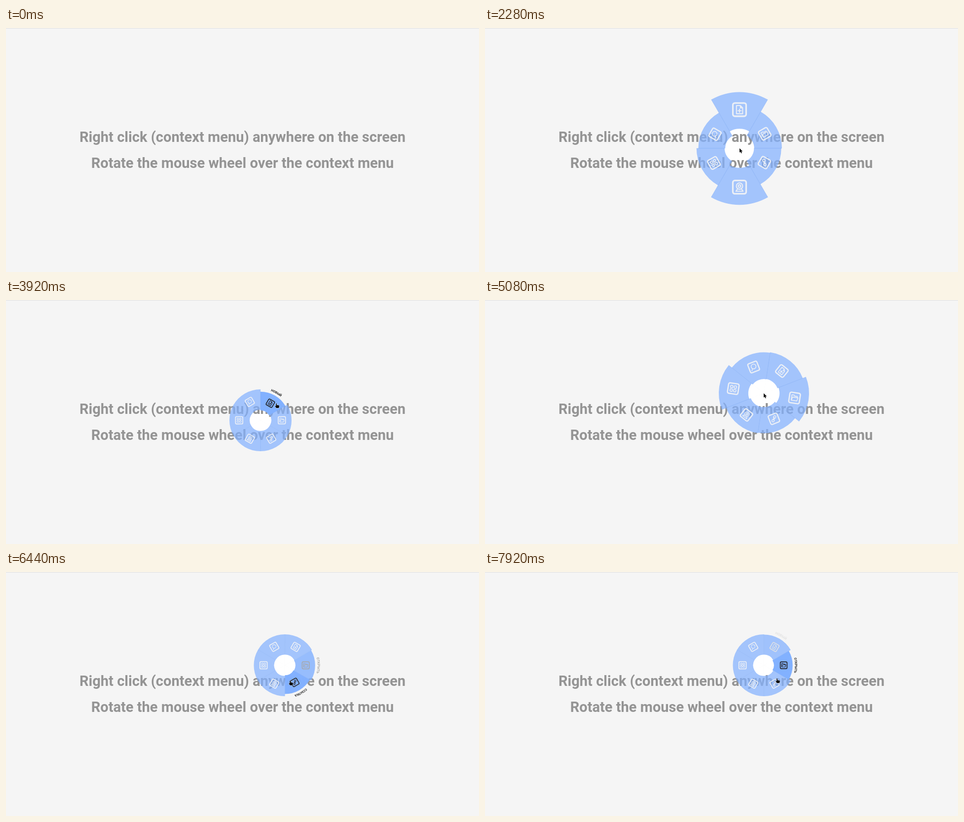
Animation of 959 by 497 pixels, one loop 8 s. Source, as an HTML page with a canvas:

```html
<!DOCTYPE html>
<html lang="en">
<head>
<meta charset="utf-8">
<title>Radial context menu</title>
<style>
  html, body { margin: 0; width: 100%; height: 100%; overflow: hidden; background: #f5f5f5; }
  canvas { display: block; }
</style>
</head>
<body>
<canvas id="stage" width="959" height="497"></canvas>
<script>
const ctx = document.getElementById('stage').getContext('2d');
const LOOP = 8000, RAD = Math.PI / 180;
const OUTER = 63, INNER = 21.8, ICON_R = 43.3, LABEL_R = 68;
const HEADING = [
  ['Right click (context menu) anywhere on the screen', 232],
  ['Rotate the mouse wheel over the context menu', 285]
];

const clamp = (v, a = 0, b = 1) => Math.min(b, Math.max(a, v));
const mix = (a, b, k) => a + (b - a) * k;
const smooth = k => { k = clamp(k); return k * k * (3 - 2 * k); };
const easeOut = k => 1 - (1 - clamp(k)) ** 2;

// Icon glyphs, drawn around the centre of a 16 px tile.
function strokePath(d) { ctx.stroke(new Path2D(d)); }

function drawFile() {
  strokePath('M-3.4 -4.6H1L3.5 -2.1V4.6H-3.4Z M1 -4.6V-2H3.5 M0 -.6V3 M-1.8 1.2H1.8');
}
function drawFolder() {
  strokePath('M-4.3 3.7V-3.9H-1.2L0 -2.6H3.6V-1 M-4.3 3.7L-2.7 -.9H4.7L3.6 3.7Z');
}
function drawLink() {
  ctx.save();
  ctx.rotate(45 * RAD);
  for (const y of [-3, 3]) {
    ctx.beginPath();
    ctx.roundRect(-1.7, y - 2.2, 3.4, 4.4, 1.7);
    ctx.stroke();
  }
  strokePath('M0 -2V2');
  ctx.restore();
}
function drawCamera() {
  for (const r of [3.5, 1.4]) {
    ctx.beginPath();
    ctx.arc(0, -1.2, r, 0, 7);
    ctx.stroke();
  }
  strokePath('M-2.4 2.3L-4 4.6H4L2.4 2.3');
}
function drawGrid() {
  for (const x of [-4.2, .9]) for (const y of [-4.2, .9]) {
    ctx.beginPath();
    ctx.roundRect(x, y, 3.3, 3.3, .7);
    ctx.stroke();
  }
}
function drawSearch() {
  ctx.beginPath();
  ctx.arc(.2, -.8, 3.7, 0, 7);
  ctx.stroke();
  strokePath('M-2.3 2L-4.6 4.5');
}

// Clockwise from the top; turn keeps each icon upright.
const ITEMS = [
  { label: 'НОВЫЙ', icon: drawFile, turn: 0 },
  { label: 'ОТКРЫТЬ', icon: drawFolder, turn: -90 },
  { label: 'ССЫЛКА', icon: drawLink, turn: -180 },
  { label: 'КАМЕРА', icon: drawCamera, turn: -180 },
  { label: 'МОДУЛИ', icon: drawGrid, turn: -270 },
  { label: 'ПОИСК', icon: drawSearch, turn: 0 }
];

const MENUS = [
  { open: 2080, close: 4000, x: 516, y: 245, spin: -60,
    swell: [.83, .37, .35, .84, .39, .33], dip: [0, 0, 0, .02, 0, 0] },
  { open: 4640, close: Infinity, x: 565.5, y: 190, spin: 40,
    swell: [.65, .86, .55, .58, .86, .62], dip: [-.05, -.135, -.17, -.07, -.09, -.09] }
];

// Value from [time, value] keys.
function track(keys, t) {
  if (t <= keys[0][0]) return keys[0][1];
  for (let i = 1; i < keys.length; i++) {
    const [t0, a] = keys[i - 1], [t1, b] = keys[i];
    if (t < t1) return mix(a, b, (t - t0) / (t1 - t0));
  }
  return keys[keys.length - 1][1];
}

const ORBIT = [[5600, 0], [5880, 92], [6100, 89], [6240, 84], [6290, 62], [6440, 34], [7920, 39]];

function cursorAt(t) {
  if (t < 1300) {
    const k = easeOut((t - 480) / 800);
    return [mix(47, 415, k), mix(-12, 210, k)];
  }
  if (t < 2900) {
    const k = smooth((t - 1320) / 560), q = 1 - k;
    return [415 * q * q + 920 * q * k + 516 * k * k, 210 * q * q + 560 * q * k + 245 * k * k];
  }
  if (t < 3900) {
    const k = smooth((t - 2960) / 760);
    return [mix(516, 549, k), mix(245, 211, k)];
  }
  if (t < 5600) {
    const k = smooth((t - 3980) / 440);
    return [mix(549, 565, k), mix(211, 190, k)];
  }
  const a = (159 + .4696 * (t - 6440)) * RAD, r = track(ORBIT, t);
  return [565 + r * Math.sin(a), 190 - r * Math.cos(a)];
}

const menuAt = t => MENUS.find(m => t >= m.open && t < m.close + 240);
const rotation = (m, t) => m.spin * Math.exp(-(t - m.open) / 290);

function hoverAt(m, t) {
  if (t < m.open + 300 || t > m.close + 60) return -1;
  const [x, y] = cursorAt(t), dx = x - m.x, dy = y - m.y, r = Math.hypot(dx, dy);
  if (r < INNER || r > 68) return -1;
  const deg = Math.atan2(dx, -dy) / RAD - rotation(m, t);
  return Math.floor(((deg % 360) + 360) % 360 / 60);
}

// Recent hovering, weighted by age, gives each sector a soft highlight.
function highlights(m, t) {
  const sums = ITEMS.map(() => 0);
  let total = 0;
  for (let age = 0; age < 320; age += 4) {
    const w = Math.exp(-age / 45), i = hoverAt(m, t - 35 - age);
    total += w;
    if (i >= 0) sums[i] += w;
  }
  return sums.map(s => clamp(1.4 * s / total));
}

function sectorScale(m, i, t, hover) {
  const age = t - m.open, k = age / 170;
  const bump = k * Math.exp(1 - k);
  const settle = Math.exp(-(((age - 920) / 220) ** 2));
  const shrink = 1 - smooth((t - m.close) / 240);
  return (smooth(age / 160) + m.swell[i] * bump + m.dip[i] * settle) * (1 - .075 * hover) * shrink;
}

function wedge(inner, outer) {
  const a = -120 * RAD, b = -60 * RAD;
  ctx.beginPath();
  ctx.arc(0, 0, outer, a, b);
  if (inner) ctx.arc(0, 0, inner, b, a, true);
  else ctx.lineTo(0, 0);
  ctx.closePath();
}

function drawLabel(text, alpha) {
  ctx.save();
  ctx.globalAlpha *= alpha;
  ctx.fillStyle = '#222';
  ctx.font = '700 7px Roboto, sans-serif';
  ctx.textAlign = 'center';
  ctx.rotate(-ctx.measureText(text).width / 2 / LABEL_R);
  for (const ch of text) {
    const half = ctx.measureText(ch).width / 2 / LABEL_R;
    ctx.rotate(half);
    ctx.fillText(ch, 0, -LABEL_R);
    ctx.rotate(half);
  }
  ctx.restore();
}

function drawIcon(item, angle, hover) {
  const shade = Math.round(mix(245, 35, hover));
  ctx.save();
  ctx.translate(0, -ICON_R);
  ctx.rotate(item.turn * RAD);
  ctx.strokeStyle = `rgba(${shade},${shade},${shade},${mix(.88, 1, hover)})`;
  ctx.lineJoin = ctx.lineCap = 'round';
  ctx.lineWidth = 1.8;
  ctx.beginPath();
  ctx.roundRect(-7.4, -7.4, 14.8, 14.8, 2.2);
  ctx.stroke();
  ctx.lineWidth = 1.15;
  item.icon();
  ctx.restore();
}

function eachSector(m, t, glow, paint) {
  const alpha = clamp((t - m.open) / 120) * (1 - smooth((t - m.close) / 240));
  ITEMS.forEach((item, i) => {
    const s = sectorScale(m, i, t, glow[i]);
    if (s < .01) return;
    const angle = 30 + 60 * i + rotation(m, t);
    ctx.save();
    ctx.globalAlpha = alpha;
    ctx.translate(m.x, m.y);
    ctx.rotate(angle * RAD);
    ctx.scale(s, s);
    paint(item, angle, glow[i]);
    ctx.restore();
  });
}

function paintHole() {
  wedge(0, INNER + .5);
  ctx.fillStyle = '#fff';
  ctx.fill();
}

function paintSector(item, angle, hover) {
  wedge(INNER, OUTER);
  ctx.fillStyle = `rgba(130,177,255,${mix(.71, 1, hover)})`;
  ctx.fill();
  ctx.beginPath();
  for (const side of [-1, 1]) {
    const x = side * Math.sin(30 * RAD), y = -Math.cos(30 * RAD);
    ctx.moveTo(x * INNER, y * INNER);
    ctx.lineTo(x * OUTER, y * OUTER);
  }
  ctx.strokeStyle = 'rgba(100,150,235,.22)';
  ctx.lineWidth = .6;
  ctx.stroke();
  drawIcon(item, angle, hover);
  if (hover > .01) drawLabel(item.label, hover);
}

function drawHeading() {
  ctx.fillStyle = '#949494';
  ctx.font = '700 29.05px Roboto, sans-serif';
  ctx.textAlign = 'center';
  for (const [text, y] of HEADING) ctx.fillText(text, 479.5, y);
}

function drawCursor(t, hand) {
  const [x, y] = cursorAt(t);
  ctx.save();
  ctx.translate(x, y);
  ctx.fillStyle = '#0a0a0a';
  ctx.strokeStyle = 'rgba(255,255,255,.75)';
  ctx.lineWidth = 1;
  const shape = new Path2D(hand
    ? 'M-1.6 0Q-.8 -1 0 0V3L4 3.6Q5 4 5 5L4.2 9H-1L-3.4 5.5Q-3.2 4 -1.6 5Z'
    : 'M0 0V8.8L2 7L3.5 10.2L5 9.5L3.6 6.4L6.3 6.2Z');
  ctx.stroke(shape);
  ctx.fill(shape);
  ctx.restore();
}

function draw(t) {
  const menu = menuAt(t), glow = menu && highlights(menu, t);
  ctx.fillStyle = '#f5f5f5';
  ctx.fillRect(0, 0, 959, 497);
  ctx.fillStyle = '#e0e0e0';
  ctx.fillRect(0, 0, 959, 1);
  if (menu) eachSector(menu, t, glow, paintHole);
  drawHeading();
  if (menu) eachSector(menu, t, glow, paintSector);
  if (t >= 480) drawCursor(t, menu && hoverAt(menu, t) >= 0);
}

const start = performance.now();
function tick() {
  draw((performance.now() - start) % LOOP);
  requestAnimationFrame(tick);
}
tick();
</script>
</body>
</html>
```
